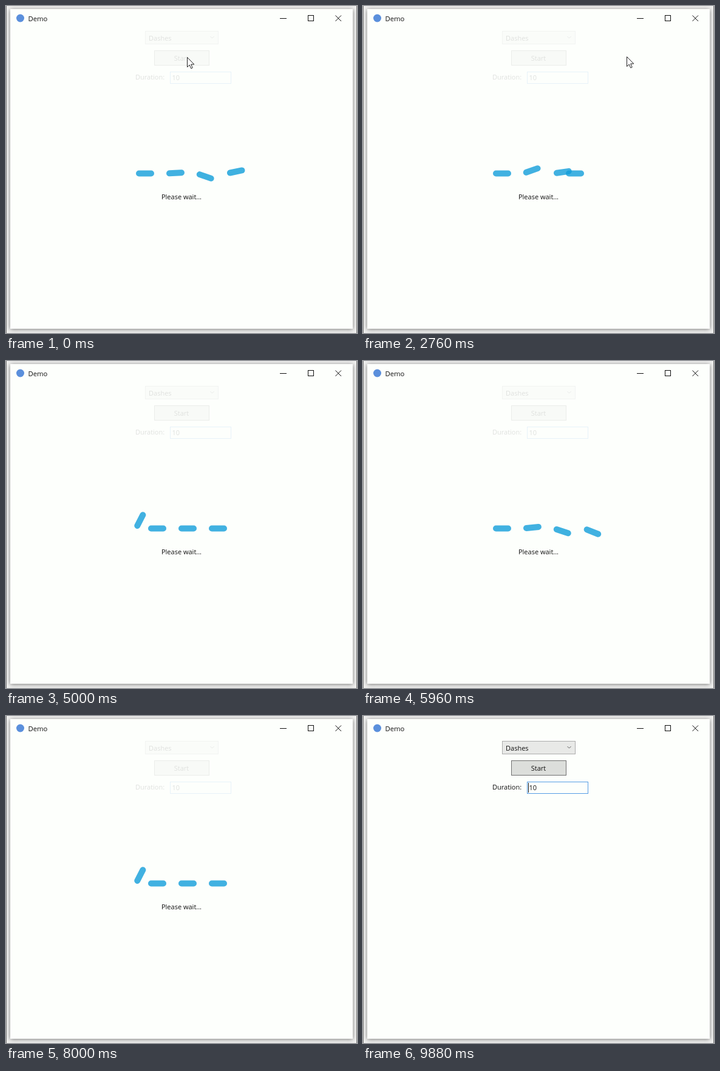
Animation of 578 by 538 pixels, one loop 10 s. Source, as an HTML page:

```html
<!DOCTYPE html>
<html lang="en">
<head>
<meta charset="utf-8">
<title>Demo</title>
<style>
  html, body { margin: 0; width: 100%; height: 100%; overflow: hidden; }
  body { position: relative; background: #f1f1f0; }
  #window {
    position: absolute; left: 7px; top: 5px; width: 564px; height: 526px;
    background: #fdfffc; box-shadow: 0 1px 7px rgba(0, 0, 0, .5);
  }
  svg { position: absolute; left: 0; top: 0; display: block; }
  text { font: 11px "Open Sans", "Noto Sans", sans-serif; fill: #111; }
</style>
</head>
<body>
<div id="window"></div>
<svg width="578" height="538" viewBox="0 0 578 538">
  <path d="M.5 0V538M577.5 0V538" stroke="#777"/>

  <!-- title bar -->
  <circle cx="23.5" cy="20" r="6.5" fill="#5b8fdc"/>
  <text x="36.5" y="25" style="font-size:11.3px">Demo</text>
  <g fill="none" stroke="#111">
    <path d="M451 20.5H462"/>
    <rect x="497.5" y="15.5" width="9" height="9"/>
    <path d="M542.5 15.5L552 25M552 15.5L542.5 25"/>
  </g>

  <g id="controls">
    <rect x="229.5" y="41.5" width="120" height="21" fill="#e8e9e7" stroke="#acacac"/>
    <text x="235" y="57">Dashes</text>
    <path d="M336.5 50L339.5 53L342.5 50" fill="none" stroke="#606060"/>
    <rect x="244.5" y="73.5" width="90" height="24" fill="#dcdedb" stroke="#707070"/>
    <text x="289" y="90" text-anchor="middle">Start</text>
    <text x="213" y="121">Duration:</text>
    <rect x="270.5" y="108.5" width="100" height="19" fill="#fdfffc" stroke="#569de5"/>
    <text x="273.5" y="122">10</text>
    <path id="caret" d="M272.5 110V126" stroke="#111"/>
  </g>

  <g id="busy">
    <g id="dashes" fill="#119eda" fill-opacity=".8"></g>
    <text x="289" y="318" text-anchor="middle">Please wait...</text>
  </g>

  <path id="cursor" d="M.5 .5V16.5L4.2 13L6.8 18.8L9.2 17.7L6.7 12H11.8Z" fill="#fff" stroke="#222"/>
</svg>

<script>
const LOOP = 10000, STEP = 40, PERIOD = 3000, HALF = PERIOD / 2;
const BUSY_END = 9760, CARET_AT = 9880;
const PIVOTS = [214, 264, 314, 364], AXIS = 275.5;

// Degrees turned after the outer dash lands, as [ms, value]
const FIRST = [[0, 0], [215, 180], [425, 200], [700, 180]];
const SECOND = [[215, 0], [430, 180], [640, 200], [1010, 180]];
const OUTER = [[430, 0], [700, 225], [1160, 297], [1500, 360]];

const MOUSE_X = [[200, 298], [700, 434], [3880, 434], [4040, 538]];
const MOUSE_Y = [[200, 84], [700, 83], [3880, 83], [4040, 92]];
const MOUSE_END = 4080;

const $ = id => document.getElementById(id);
const show = (el, on) => el.setAttribute('visibility', on ? 'visible' : 'hidden');

function lerp(track, t) {
  if (t <= track[0][0]) return track[0][1];
  for (let i = 1; i < track.length; i++) {
    const [t0, a] = track[i - 1], [t1, b] = track[i];
    if (t < t1) return a + (b - a) * (t - t0) / (t1 - t0);
  }
  return track[track.length - 1][1];
}

const dashes = PIVOTS.map(x => {
  const el = document.createElementNS('http://www.w3.org/2000/svg', 'rect');
  const attrs = { x, y: AXIS - 5, width: 30, height: 10, rx: 5 };
  for (const key in attrs) el.setAttribute(key, attrs[key]);
  return $('dashes').appendChild(el);
});

// A middle dash makes half a turn in each direction of the chain
const middle = (e, there, back) =>
  e < HALF ? lerp(there, e) : 180 + lerp(back, e - HALF);

// Clockwise angles of the four dashes
function angles(t) {
  const right = (t + PERIOD - 2340) % PERIOD;
  const left = (right + HALF) % PERIOD;
  return [
    lerp(OUTER, left),
    180 - middle(right, FIRST, SECOND),
    180 + middle(right, SECOND, FIRST),
    180 - lerp(OUTER, right)
  ];
}

function draw(t) {
  const busy = t < BUSY_END;
  show($('busy'), busy);
  $('controls').setAttribute('opacity', busy ? .12 : 1);
  show($('caret'), t >= CARET_AT);
  angles(t).forEach((a, i) =>
    dashes[i].setAttribute('transform', `rotate(${a} ${PIVOTS[i]} ${AXIS})`));
  show($('cursor'), t < MOUSE_END);
  $('cursor').setAttribute('transform',
    `translate(${Math.round(lerp(MOUSE_X, t))} ${Math.round(lerp(MOUSE_Y, t))})`);
}

const start = performance.now();
function tick() {
  const t = (performance.now() - start) % LOOP;
  draw(Math.floor(t / STEP) * STEP);
  requestAnimationFrame(tick);
}
tick();
</script>
</body>
</html>
```
